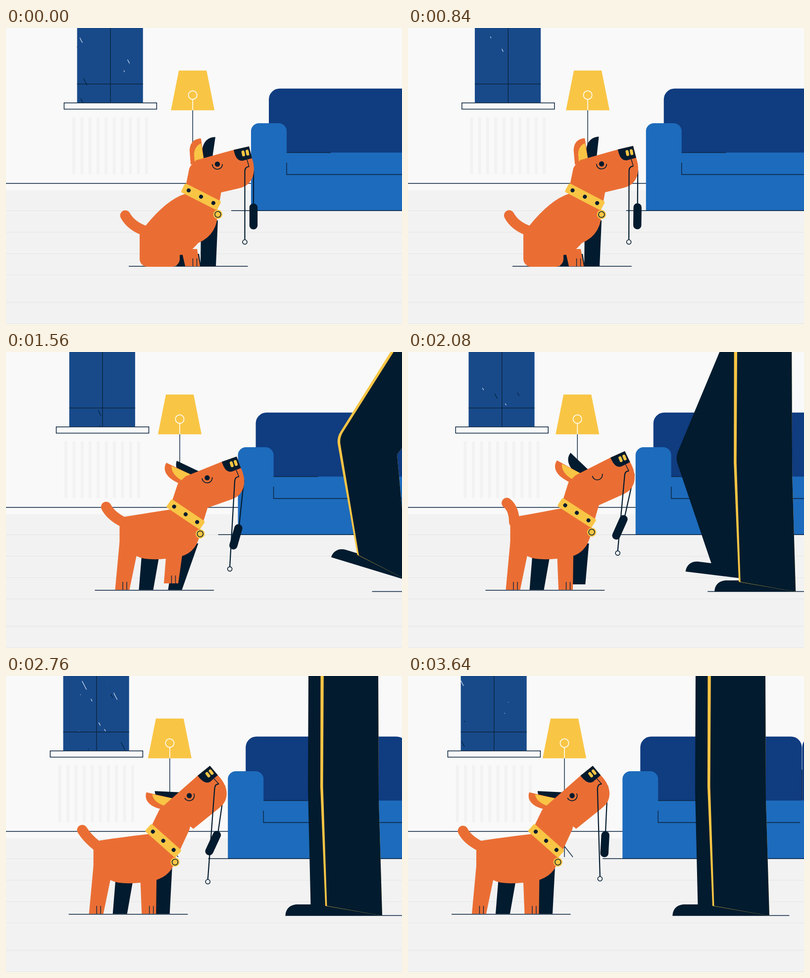
Recreate the animation shown at these times as an HTML page with a canvas. Size 800 px wide and 600 px high, loop 3.68 s.

```html
<!DOCTYPE html>
<html lang="en">
<head>
<meta charset="utf-8">
<title>Dog waiting for a walk</title>
<style>
  html, body { margin: 0; width: 100%; height: 100%; overflow: hidden; background: #f9f9f9; }
  canvas { display: block; width: 800px; height: 600px; }
</style>
</head>
<body>
<canvas id="stage" width="800" height="600"></canvas>
<script>
const ctx = document.getElementById('stage').getContext('2d');
const LOOP = 3680, STEP = 40, RAD = Math.PI / 180;
const WALL = '#f9f9f9', FLOOR = '#f2f2f2', NAVY = '#021b2e', LINE = '#0b2540',
      ORANGE = '#ea6e34', YELLOW = '#f9c545', GLASS = '#184a8a',
      CUSHION = '#103c80', SOFA = '#1d6bbc';

// ---------- motion helpers ----------
const clamp = u => Math.max(0, Math.min(1, u));
const ease = (t, from, to) => { const u = clamp((t - from) / (to - from)); return u * u * (3 - 2 * u); };
const bump = (t, mid, reach) => 1 - ease(Math.abs(t - mid), 0, reach);
const wave = (t, peak, period) => Math.cos((t - peak) / period * 2 * Math.PI);
const random = n => { const v = Math.sin(n * 127.1 + 11.7) * 43758.5453; return v - Math.floor(v); };
const mix = (a, b, u) => a.map((v, i) => v + (b[i] - v) * u);

// ---------- drawing helpers ----------
function turn(x, y, deg) {
  const c = Math.cos(deg * RAD), s = Math.sin(deg * RAD);
  return [x * c - y * s, x * s + y * c];
}

// Maps local points of a turned part to the stage.
const placer = (ox, oy, deg) => (x, y) => {
  const [dx, dy] = turn(x, y, deg);
  return [ox + dx, oy + dy];
};

function at(x, y, deg, draw) {
  ctx.save();
  ctx.translate(x, y);
  ctx.rotate(deg * RAD);
  draw();
  ctx.restore();
}

function fill(path, color) { ctx.fillStyle = color; ctx.fill(path); }
function stroke(path, color = LINE, width = 1.4) {
  ctx.strokeStyle = color;
  ctx.lineWidth = width;
  ctx.stroke(path);
}
const svg = d => new Path2D(d);
function line(x1, y1, x2, y2, color, width) { stroke(svg(`M${x1} ${y1}L${x2} ${y2}`), color, width); }
function box(x, y, w, h, color) { ctx.fillStyle = color; ctx.fillRect(x, y, w, h); }
function rounded(x, y, w, h, r) { const p = new Path2D(); p.roundRect(x, y, w, h, r); return p; }
function disc(x, y, r) { const p = new Path2D(); p.arc(x, y, r, 0, 7); return p; }

// ---------- room ----------
function drawRoom() {
  box(0, 0, 800, 600, WALL);
  box(0, 329, 800, 271, FLOOR);
  for (const y of [370.5, 414, 457.5, 500.5, 556, 599.5]) line(0, y, 800, y, '#e3e4e6', 1.2);
  line(0, 315, 800, 315, LINE, 1.7);
}

function drawRain(t) {
  const age = (seed, life) => (t - random(seed) * LOOP + LOOP) % LOOP / life;
  for (let i = 0; i < 95; i++) {
    const u = age(i, 240);
    if (u > 1) continue;
    const len = (5 + 28 * random(i + 500) ** 2) * Math.sin(Math.PI * u);
    const x = random(i + 200) * 150 - 25 + 35 * u;
    const y = random(i + 300) * 150 - 35 + 67 * u;
    line(x, y, x + len * .46, y + len * .89, i % 4 ? '#e9f1fa' : NAVY, 1.1);
  }
  for (let i = 700; i < 714; i++) {
    const u = age(i, 200);
    if (u > 1) continue;
    const x = 10 + random(i + 100) * 113;
    for (let a = 180; a <= 360; a += 45)
      line(...placer(x, 150, a)(2 + 4 * u, 0), ...placer(x, 150, a)(6.5, 0), '#e9f1fa', 1);
  }
}

function drawWindow(t) {
  ctx.save();
  ctx.translate(143.4 - .01016 * t, 0);
  for (let i = 0; i < 10; i++) box(-9.5 + i * 16.33, 181, 6, 115, FLOOR);
  ctx.save();
  ctx.beginPath();
  ctx.rect(0, 0, 133.3, 151.5);
  ctx.clip();
  box(0, 0, 134, 152, GLASS);
  line(67.5, 0, 67.5, 152);
  line(0, 113.5, 134, 113.5);
  drawRain(t);
  ctx.restore();
  stroke(svg('M-26 151.8H161V164.6H-26Z'), LINE, 1.5);
  ctx.restore();
}

function drawLamp(t) {
  ctx.save();
  ctx.translate(377.2 - .0168 * t, 0);
  stroke(svg('M0 166V367M0 345L17 367M0 345L-17 367'));
  fill(svg('M-28 86.3H28L44 166.7H-44Z'), YELLOW);
  stroke(disc(0, 136, 8.7), '#fffdf2', 1.7);
  line(0, 145, 0, 166.7, '#fffdf2', 1.7);
  ctx.restore();
}

function drawSofa(t) {
  ctx.save();
  ctx.translate(495 - .01695 * t, 0);
  for (const x of [36, 363]) fill(rounded(x, 122.7, 326.3, 135, [22, 22, 0, 0]), CUSHION);
  box(70, 252.5, 700, 117.5, SOFA);
  fill(rounded(0, 193, 72, 177, [16, 16, 0, 0]), SOFA);
  stroke(svg('M72 252.5H161.5M72 273V297H359M362.5 190V252M-40 370.3H700'));
  ctx.restore();
}

// ---------- person ----------
function drawLeg({ hip, knee, backHip, backKnee, toe, tilt }, striped) {
  const foot = placer(...toe, tilt);
  const shank = (inset, ankle) => {
    const p = new Path2D();
    p.moveTo(hip + inset * 1.15, -2);
    p.arcTo(knee[0] + inset, knee[1], ...foot(ankle, -20), 36);
    p.lineTo(...foot(ankle, -20));
    p.lineTo(...foot(164, 0));
    p.lineTo(...backKnee);
    p.lineTo(backHip, -2);
    return p;
  };
  at(...toe, tilt, () => fill(svg('M0 0C0-14 10-23 24-23H160L164 0Z'), NAVY));
  if (striped) fill(shank(0, 49), YELLOW);
  fill(striped ? shank(5.5, 52.5) : shank(0, 51), NAVY);
}

// Each leg swings in bent, then straightens as its foot lands.
function drawPerson(t) {
  const distance = 400 * clamp((2060 - t) / 790) ** 3;
  const nearSwing = Math.max(0, (1800 - t) / 240), farSwing = Math.max(0, (2340 - t) / 260);
  const nearBend = Math.min(1, nearSwing), farBend = ease(farSwing, 0, 1);
  const nearDrift = 20 * nearSwing ** 4, farDrift = 90 * Math.max(0, farSwing - 1) ** 2;
  const farHip = 581 - 4 * farBend + distance + farDrift / 2;
  const ground = 534.5 + 1.15 * distance + 17.5 * farBend;

  ctx.save();
  ctx.translate(.0341 * (3640 - t), 0);
  line(ground, 485.5, ground + 236, 485.5);
  drawLeg({
    hip: farHip,
    knee: [580 - 93 * farBend + farDrift, 230 - 16 * farBend],
    backHip: farHip + 110,
    backKnee: [690 + farDrift, 250],
    toe: [534.5 - 27 * farBend + farDrift, 486 - 41 * farBend],
    tilt: 7 * farBend
  }, false);
  drawLeg({
    hip: 605.5 + distance,
    knee: [605 - 28 * nearBend + nearDrift, 224 - 50 * nearBend],
    backHip: 722 + 1.5 * distance,
    backKnee: [723 - 24 * nearBend + nearDrift, 250 - 42 * nearBend],
    toe: [566 + nearDrift, 486 - 70 * nearBend],
    tilt: 17 * nearBend
  }, true);
  ctx.restore();
}

// ---------- dog ----------
// Limbs, sitting and standing: top x, y, width, then foot x, y, width
const LIMBS = {
  farHind: [[120, 458, 44, 121, 483, 50], [113, 408, 36, 103.5, 482, 29]],
  farFore: [[163, 390, 34, 160.5, 483, 31], [186, 388, 46, 162, 482, 28]],
  nearHind: [[62.5, 425, 81, 62.5, 484, 81], [70, 385, 40, 55.5, 482, 29]],
  nearFore: [[122, 448, 32, 129, 483, 30], [161, 405, 33, 162, 482, 29]]
};

function drawLimb(name, stand, color, { dx = 0, lift = 0, radius = 0, toes = false } = {}) {
  const [x, y, w, fx, fy, fw] = mix(...LIMBS[name], stand);
  const left = fx + dx - fw / 2, right = left + fw, floor = fy - lift;
  const p = new Path2D();
  p.moveTo(x - w / 2, y);
  p.arcTo(left, floor, right, floor, radius);
  p.arcTo(right, floor, x + w / 2, y, radius);
  p.lineTo(x + w / 2, y);
  fill(p, color);
  if (toes) for (const toe of [15.5, 23.5]) line(left + toe, floor - 16, left + toe, floor);
}

function drawTorso(stand, collar) {
  const joint = (sit, up) => mix(sit, up, stand);
  const p = new Path2D();
  p.moveTo(...collar(-31, 9));
  p.quadraticCurveTo(...joint([76, 348], [95, 328]), ...joint([33, 402], [60, 334]));
  p.lineTo(...joint([22, 419], [50, 350]));
  p.lineTo(...joint([22, 430], [50, 392]));
  p.lineTo(...joint([103, 460], [85, 414]));
  p.quadraticCurveTo(...joint([120, 460], [108, 426]), ...joint([140, 436], [172, 415]));
  p.quadraticCurveTo(...joint([182, 418], [210, 405]), ...collar(42, 9));
  p.lineTo(...collar(30, 0));
  p.lineTo(...collar(-31, 0));
  fill(p, ORANGE);
}

function drawTail(t, rise, stand) {
  const wag = wave(t, 2080, 1040);
  const [x, y, bx, by, rx, ry] = mix(
    [-7 + 5.5 * rise, 380 - 2 * rise, 5, 402, 35, 412],
    [33 + 10 * wag, 310 - 4 * wag, 45 + 13 * wag, 325 - 7 * wag, 58, 345], stand);
  stroke(svg(`M${x} ${y}Q${bx} ${by} ${rx} ${ry}`), ORANGE, 21);
}

function drawEars(nearTurn, farTurn, length, slide) {
  const ear = (x, y, deg, draw) => at(x - 8 * slide, y + 2 * slide, deg, () => {
    ctx.scale(1, length);
    draw();
  });
  ear(-43, 11, farTurn, () => fill(svg('M0 4L6-37C-10-37-21-26-21-4V12Z'), NAVY));
  ear(-64, 16, nearTurn, () => {
    fill(svg('M4 6L-2-39C-14-39-25-32-25-14L-23 14Z'), ORANGE);
    fill(svg('M4 6L-2-29C-10-26-16-18-16-6L-15 8Z'), YELLOW);
  });
}

function drawNeck(collar, head) {
  const p = new Path2D();
  p.moveTo(...collar(-37, -4));
  p.arcTo(...collar(-48, -43), ...head(-76, 21), 14);
  p.lineTo(...head(-76, 21));
  p.lineTo(...head(-30, 50));
  p.lineTo(...collar(24.5, -52));
  p.lineTo(...collar(39, -4));
  fill(p, ORANGE);
}

function drawHead(eyesClosed) {
  fill(svg('M0 0L31-7L37 17C43 35 43 55 30 68C22 76 14 77 2 80L-55 93L-84 36L-76 21Z'), ORANGE);
  fill(svg('M0 0L31-7L37 17L18 22C8 23 3 15 0 0Z'), NAVY);
  for (const [x, y] of [[19.3, 7.3], [27.7, 5.6]])
    at(x, y, -11, () => fill(rounded(-3, -6, 6, 12, 2.8), YELLOW));
  const lid = new Path2D();
  lid.arc(-33, 29, 10.3, 0, Math.PI);
  stroke(lid, NAVY, 1.6);
  if (!eyesClosed) fill(disc(-33, 29, 5.2), NAVY);
  stroke(svg('M27 20L31 34'), NAVY, 1.4);
}

function drawCollar() {
  fill(disc(46.5, 16.5, 9.2), YELLOW);
  stroke(disc(46.5, 16.5, 6), NAVY, 1.5);
  fill(rounded(-41, -10, 82, 20, 3.5), YELLOW);
  for (const x of [-28, 0, 28]) fill(disc(x, 0, 4), NAVY);
}

function drawDog(t) {
  const rise = ease(t, 780, 1180), stand = ease(t, 1270, 1560), nod = ease(t, 1600, 2080),
        lift = ease(t, 2080, 2560), settle = ease(t, 2560, 3640);
  // A resting value plus what each phase of the movement adds to it
  const pose = (rest, a, b, c, d) => rest + a * rise + b * stand + c * nod + d * lift;

  const nose = [pose(212, 12.5, 32, -4, 8), pose(247, -12, -12.5, -8.5, -12)];
  const tilt = pose(0, -7, .5, -5, -14.5);
  const neck = [pose(146, 3.5, 34, 1, 6.5), pose(342, 0, -13, -3, 8)];
  const collarTurn = pose(27, 8, -1, -1, 8.6);
  const nearEar = pose(0, -17, -41, 3, -16), farEar = pose(0, -33, -38, 18, -41);
  const head = placer(...nose, tilt), collar = placer(...neck, collarTurn);

  const sway = rise * (11 + 4 * wave(t, 1240, 840)) * (1 - .8 * settle);
  const strap = head(40, 43), mouth = head(31, 34);
  const handle = placer(...strap, sway)(0, pose(92, 11, 12, -4, 7));
  const handleTurn = pose(0, 12, 4, 8, 3) - 24 * settle;
  const ring = placer(...mouth, 3.2 - 3 * settle + .3 * sway)(0, pose(153, 15, 20, -20, 32) - 8 * settle);

  ctx.save();
  ctx.translate(248 - .04396 * t, 0);
  line(0, 483, 240.6, 483);
  drawLimb('farHind', stand, NAVY);
  drawLimb('farFore', stand, NAVY, { dx: 28 * ease(t, 1800, 2140), lift: 11 * bump(t, 2080, 240) });

  ctx.lineCap = 'round';
  drawTail(t, rise, stand);
  line(...strap, ...placer(...handle, handleTurn)(0, -24), NAVY, 2.2);
  at(...handle, handleTurn, () => fill(rounded(-8.2, -26.3, 16.4, 52.6, 8), NAVY));
  ctx.lineCap = 'butt';

  const step = bump(t, 1560, 240);
  drawTorso(stand, collar);
  drawLimb('nearHind', stand, ORANGE, { radius: 16 * (1 - stand), toes: stand > .5 });
  drawLimb('nearFore', stand, ORANGE, { dx: -8 * step, lift: 13 * step, toes: true });

  at(...nose, tilt, () => drawEars(nearEar - tilt, farEar - tilt, 1 + .1 * rise + .15 * stand, stand));
  drawNeck(collar, head);
  at(...nose, tilt, () => drawHead(t >= 1960 && t < 2200));
  at(...neck, collarTurn, drawCollar);

  const [mx, my] = mouth, [rx, ry] = ring;
  stroke(svg(`M${mx} ${my}Q${mx - 8} ${my} ${mx - 8.5} ${my + 9}L${rx} ${ry - 5}`), NAVY, 2.2);
  fill(disc(rx, ry, 4.5), WALL);
  stroke(disc(rx, ry, 4.5), NAVY, 1.6);
  ctx.restore();
}

// ---------- loop ----------
const start = performance.now();
function frame() {
  const elapsed = (performance.now() - start) % LOOP;
  const t = Math.floor(elapsed / STEP) * STEP;
  drawRoom();
  drawWindow(t);
  drawLamp(t);
  drawSofa(t);
  drawPerson(t);
  drawDog(t);
  requestAnimationFrame(frame);
}
frame();
</script>
</body>
</html>
```
